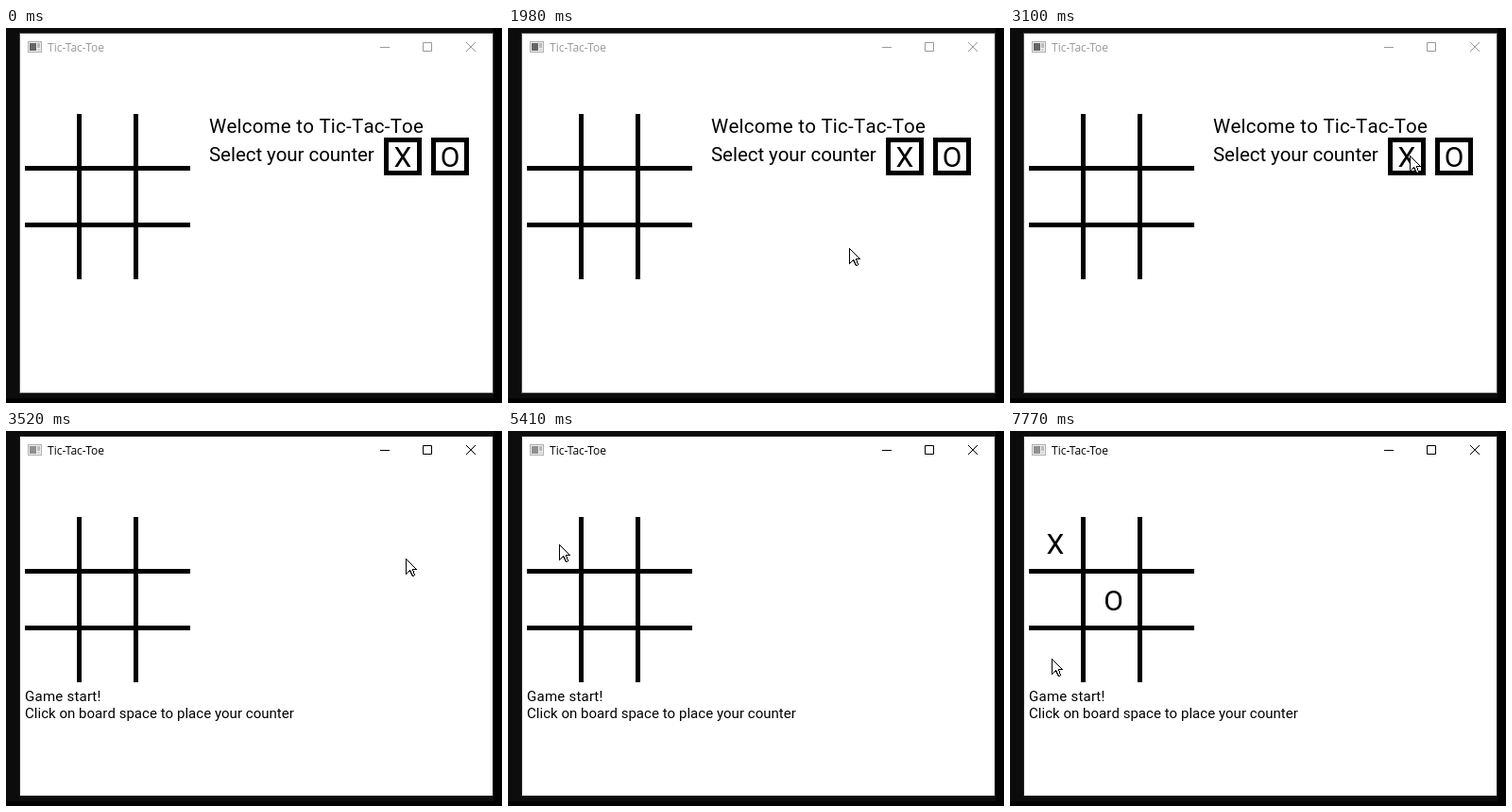
Recreate the animation shown at these times as an HTML page. Size 525x397 px, loop 8000 ms.

```html
<!DOCTYPE html>
<html lang="en">
<head>
<meta charset="utf-8">
<title>Tic-Tac-Toe</title>
<style>
  html, body { margin: 0; width: 100%; height: 100%; overflow: hidden; background: #0c0c0c; }
  svg { display: block; width: 525px; height: 397px; }
  text { font-family: Roboto, sans-serif; font-kerning: none; white-space: pre; }
  .large { font-size: 20.5px; }
  .small { font-size: 15px; }
  .mark { font-size: 30px; text-anchor: middle; }
  .caption { font: 12px "Open Sans", "Noto Sans", sans-serif; font-kerning: normal; fill: currentColor; }
  .bar { color: #999; }
  .active .bar { color: #000; }
  .pane { fill: #666; }
  .active .pane { fill: #909090; }
  .frame { fill: #4a4a4a; }
  .active .frame { fill: #222; }
  .controls { fill: none; stroke: currentColor; }
  #cursor path { fill: #fff; stroke: #000; stroke-linejoin: round; shape-rendering: crispEdges; }
</style>
</head>
<body>
<svg id="stage" viewBox="0 0 525 397">
  <rect width="525" height="397" fill="#0c0c0c"/>
  <path d="M0 392H525V397H0zM516 0H525V397H516z" fill="#000"/>
  <rect class="frame" x="14" y="5" width="502" height="382"/>
  <rect x="15" y="6" width="500" height="380" fill="#fff"/>

  <g class="bar">
    <rect x="23.5" y="14.5" width="14" height="11" fill="#eee" stroke="#b0b0b0"/>
    <rect class="pane" x="25" y="16" width="7" height="8"/>
    <path d="M33 16h3v5h-3z" fill="#bbb"/>
    <path d="M33 22h3v2h-3z" fill="#d5d5d5"/>
    <text class="caption" x="44" y="25">Tic-Tac-Toe</text>
    <g class="controls">
      <path d="M396 20.5h10M441.5 15.5h9v9h-9z"/>
      <path d="M487 15l10 10M497 15l-10 10"/>
    </g>
  </g>

  <path d="M77.5 91V266M137.5 91V266M20 148.5H195M20 208.5H195" stroke="#000" stroke-width="5"/>

  <g id="welcome">
    <text class="large" x="215" y="111" letter-spacing=".23">Welcome to Tic-Tac-Toe</text>
    <text class="large" x="215" y="141" letter-spacing="-.05">Select your counter</text>
    <path d="M402.5 118.5h35v35h-35zM452.5 118.5h35v35h-35z" fill="none" stroke="#000" stroke-width="5"/>
    <text class="mark" x="420" y="146.5">X</text>
    <text class="mark" x="470" y="146.5">O</text>
  </g>

  <g id="game">
    <text class="small" x="20" y="286" letter-spacing=".25">Game start!</text>
    <text class="small" x="20" y="304" letter-spacing=".03">Click on board space to place your counter</text>
  </g>

  <g id="marks">
    <text class="mark" x="48" y="130">X</text>
    <text class="mark" x="109.5" y="190">O</text>
  </g>

  <g id="cursor">
    <path d="M.5 .5V16.5L4.5 12.5L7.5 18.5H8.5L9.5 17.5L7.5 11.5H11.5Z"/>
    <circle id="click" r="12" fill="#ff0" fill-opacity=".47"/>
  </g>
</svg>
<script>
const LOOP = 8000, TICK = 70;
const [stage, welcome, game, marks, cursor, click] =
  ["stage", "welcome", "game", "marks", "cursor", "click"].map(id => document.getElementById(id));

// Each cursor move is a smooth curve through a few points.
const moves = [
  { start: 200, end: 340, path: [[459, 354], [434, 228], [413, 185]] },
  { start: 670, end: 880, path: [[412, 183], [405, 173]] },
  { start: 1280, end: 2050, path: [[404, 173], [435, 228], [396, 266], [352, 222]] },
  { start: 2120, end: 2890, path: [[353, 222], [390, 268], [407.5, 127], [425, 129]] },
  { start: 2960, end: 3100, path: [[425, 130], [423, 135]] },
  { start: 4640, end: 5410, path: [[421, 134], [303, 73], [151, 41], [76, 67], [54, 120]] },
  { start: 7150, end: 7770, path: [[54, 122], [97, 182], [46, 253], [44, 241]] }
];

// Catmull-Rom spline, u from 0 to 1 over the whole path.
function along(path, u) {
  const last = path.length - 1;
  const i = Math.min(last - 1, Math.floor(u * last));
  const k = u * last - i;
  const at = n => path[Math.max(0, Math.min(last, n))];
  return [0, 1].map(axis => {
    const [a, b, c, d] = [-1, 0, 1, 2].map(n => at(i + n)[axis]);
    const curve = (c - a) * k + (2 * a - 5 * b + 4 * c - d) * k * k + (3 * b - a - 3 * c + d) * k ** 3;
    return Math.round(b + curve / 2);
  });
}

function cursorAt(t) {
  const move = moves.filter(m => m.start <= t).pop();
  if (!move) return null;
  const { start, end, path } = move;
  const elapsed = Math.floor((t - start) / TICK) * TICK;
  return along(path, t >= end ? 1 : elapsed / (end - start));
}

const show = (el, on) => { el.style.display = on ? "" : "none"; };
const clicked = (t, at) => t >= at && t < at + TICK;

function render(t) {
  const pos = cursorAt(t);
  show(cursor, pos);
  if (pos) cursor.setAttribute("transform", `translate(${pos})`);
  show(click, clicked(t, 3450) || clicked(t, 5810));
  stage.classList.toggle("active", t >= 3450);
  show(welcome, t < 3520);
  show(game, t >= 3520);
  show(marks, t >= 6140);
}

const begin = performance.now();
function tick() {
  render((performance.now() - begin) % LOOP);
  requestAnimationFrame(tick);
}
tick();
</script>
</body>
</html>
```
